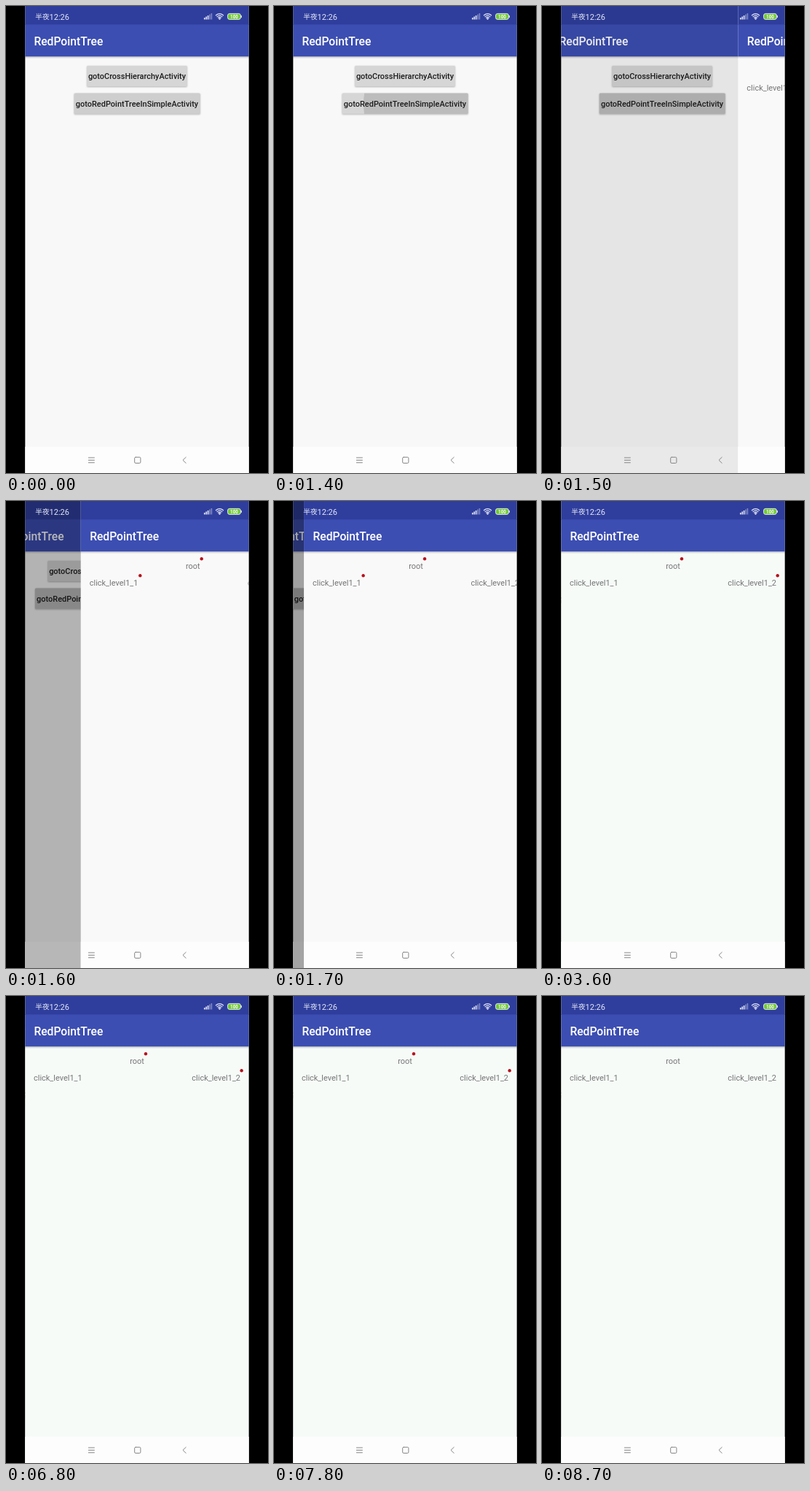
An HTML page for the animation above (8800 ms loop, 360 by 640 pixels).

```html
<!DOCTYPE html>
<html lang="en">
<head>
<meta charset="utf-8">
<title>RedPointTree</title>
<style>
  html, body { margin: 0; width: 100%; height: 100%; overflow: hidden; background: #000; }
  svg { display: block; width: 100%; height: 100%; }
  text { font-family: Roboto, sans-serif; }
  .title { font-size: 15.66px; font-weight: 500; fill: #fff; }
  .button { font-size: 10.96px; font-weight: 500; fill: #1c1c1c; text-anchor: middle; }
  .label { font-size: 10.96px; fill: #757575; }
  .dot { fill: #b9101b; }
  .cjk { font-family: "Noto Sans CJK SC", "Noto Sans CJK", sans-serif; font-size: 9.6px; }
  .line { fill: none; stroke-linecap: round; stroke-linejoin: round; }
</style>
</head>
<body>
<svg viewBox="0 0 360 640">
  <defs>
    <clipPath id="screen"><rect x="26.3" width="307.4" height="640"/></clipPath>
    <clipPath id="buttonShape"><rect x="93.7" y="119.6" width="173" height="28.2" rx="1.5"/></clipPath>
    <linearGradient id="shade" x2="0" y2="1">
      <stop stop-opacity=".22"/><stop offset="1" stop-opacity="0"/>
    </linearGradient>
    <filter id="soft"><feGaussianBlur stdDeviation="1"/></filter>
    <g id="chrome">
      <rect x="26" y="604" width="308" height="36" fill="#fdfdfd"/>
      <rect x="26" width="308" height="26" fill="#2f3e9c"/>
      <rect x="26" y="25.3" width="308" height="43.9" fill="#3c4eb2"/>
      <rect x="26" y="69.2" width="308" height="3" fill="url(#shade)"/>
      <text class="title" x="38.4" y="53.6">RedPointTree</text>
    </g>
  </defs>
  <rect width="360" height="640"/>
  <g clip-path="url(#screen)">
    <g id="home">
      <rect x="26" width="308" height="640" fill="#f8f8f8"/>
      <use href="#chrome"/>
      <g filter="url(#soft)" opacity=".28">
        <rect x="111.3" y="82.6" width="137.4" height="28.4"/>
        <rect x="93.7" y="120.3" width="173" height="28.4"/>
      </g>
      <g fill="#d6d6d6">
        <rect x="111.3" y="81.9" width="137.4" height="28.2" rx="1.5"/>
        <rect x="93.7" y="119.6" width="173" height="28.2" rx="1.5"/>
      </g>
      <g clip-path="url(#buttonShape)">
        <rect id="afterglow" x="93" y="119" width="175" height="30"/>
        <circle id="ripple" cx="215" cy="134" opacity=".12"/>
      </g>
      <text class="button" x="180" y="100">gotoCrossHierarchyActivity</text>
      <text class="button" x="180" y="137.7">gotoRedPointTreeInSimpleActivity</text>
    </g>
    <rect id="dim" x="26" width="308" height="640"/>
    <g id="tree">
      <rect id="treeBack" x="26" width="308" height="640"/>
      <use href="#chrome"/>
      <text class="label" x="180" y="93.2" text-anchor="middle">root</text>
      <text class="label" x="38" y="116">click_level1_1</text>
      <text class="label" x="322" y="116" text-anchor="end">click_level1_2</text>
      <circle class="dot" id="rootDot" cx="192" cy="79.2" r="2.2"/>
      <circle class="dot" id="firstDot" cx="107.6" cy="102.2" r="2.2"/>
      <circle class="dot" id="secondDot" cx="323.7" cy="102.2" r="2.2"/>
    </g>
    <!-- status bar -->
    <g fill="#e4e7f7">
      <text class="cjk" x="40.3" y="18.4">半夜</text>
      <text x="59.6" y="18.7" font-size="11">12:26</text>
      <path d="M272 16h1.6v2.4h-1.6zM274.4 14.6h1.6v3.8h-1.6zM276.8 13h1.6v5.4h-1.6z"/>
      <path d="M279.2 11.6h1.6v6.8h-1.6zM281.6 10h1.6v8.4h-1.6z" opacity=".45"/>
      <circle cx="293.5" cy="17.5" r="1.2"/>
    </g>
    <path class="line" stroke="#e4e7f7" stroke-width="1.2" d="M288.4 12.8q5.1-4.4 10.2 0M290 14.6q3.5-2.9 7 0M291.6 16.2q1.9-1.5 3.8 0"/>
    <rect x="304.6" y="10.4" width="17.8" height="8" rx="2.6" fill="#72c837" stroke="#e4e7f7"/>
    <path d="M323.4 13v3" stroke="#e4e7f7"/>
    <text x="313.5" y="16.7" font-size="6.3" font-weight="700" text-anchor="middle" fill="#fff">100</text>
    <!-- navigation bar -->
    <g class="line" stroke="#858585" stroke-width="1">
      <path d="M113.4 619h8M113.4 622.4h8M113.4 625.8h8"/>
      <rect x="176.7" y="618.3" width="8.2" height="8.2" rx="1.5"/>
      <path d="M247.2 618.4l-4.2 4 4.2 4"/>
    </g>
  </g>
</svg>
<script>
  const LOOP = 8800, STEP = 100, WIDTH = 307.4;
  const SLIDE_START = 1476, SLIDE_TIME = 423;
  const clamp = v => Math.min(1, Math.max(0, v));
  const set = (id, attrs) => {
    const node = document.getElementById(id);
    for (const name in attrs) node.setAttribute(name, attrs[name]);
  };
  const shift = x => `translate(${x.toFixed(2)} 0)`;
  const show = on => ({ visibility: on ? "visible" : "hidden" });

  function draw(t) {
    const slide = 1 - (1 - clamp((t - SLIDE_START) / SLIDE_TIME)) ** 4;
    set("afterglow", { opacity: 0.035 * (1 - clamp(t / 500)) });
    set("ripple", { r: t < 1200 ? 0 : 92 * clamp((t - 1150) / 350) * 1.4 });
    set("home", { transform: shift(-0.233 * WIDTH * slide) });
    set("dim", { opacity: 0.37 * slide });
    set("tree", { transform: shift(WIDTH * (1 - slide)), ...show(slide > 0) });
    set("treeBack", { fill: t < 1900 ? "#f9f9f9" : "#f6fbf8" });
    set("firstDot", show(slide > 0 && t < 3500));
    set("rootDot", show(slide > 0 && t < 8700));
    set("secondDot", show(slide > 0 && t < 8700));
  }

  const start = performance.now();
  function tick() {
    const t = (performance.now() - start) % LOOP;
    draw(Math.floor(t / STEP) * STEP);
    requestAnimationFrame(tick);
  }
  tick();
</script>
</body>
</html>
```
